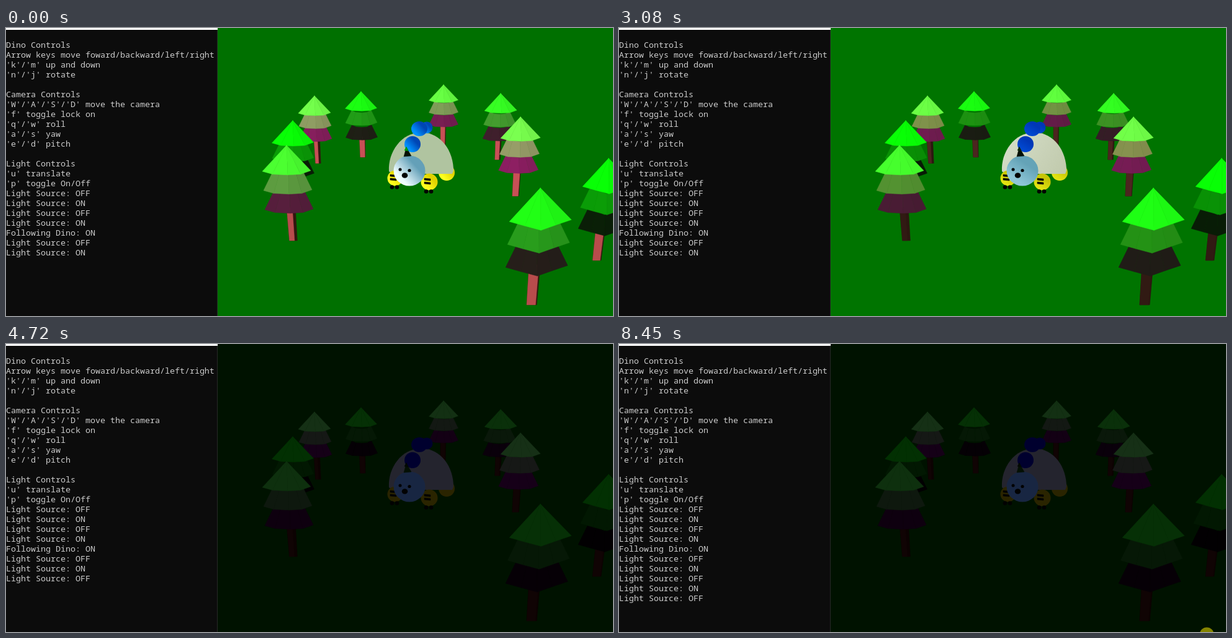
An HTML page with a canvas that plays this animation: 978 px wide and 466 px high, repeating every 8580 ms.

```html
<!DOCTYPE html>
<html lang="en">
<head>
<meta charset="utf-8">
<title>Dino scene with moving light</title>
<style>
html, body { margin: 0; width: 978px; height: 466px; overflow: hidden; background: #0c0c0c; }
canvas { position: absolute; left: 0; top: 0; }
pre { position: absolute; left: 0; top: 19px; margin: 0; color: #ccc;
  font: 13.333px/16px "Noto Sans Mono", monospace; }
</style>
</head>
<body>
<canvas id="stage" width="978" height="466"></canvas>
<pre id="log"></pre>
<script>
const LOOP = 8580;
const ctx = document.getElementById('stage').getContext('2d');
const log = document.getElementById('log');

const HELP = `Dino Controls
Arrow keys move foward/backward/left/right
'k'/'m' up and down
'n'/'j' rotate

Camera Controls
'W'/'A'/'S'/'D' move the camera
'f' toggle lock on
'q'/'w' roll
'a'/'s' yaw
'e'/'d' pitch

Light Controls
'u' translate
'p' toggle On/Off
Light Source: OFF
Light Source: ON
Light Source: OFF
Light Source: ON
Following Dino: ON
Light Source: OFF
Light Source: ON`;
const TOGGLES = [[4720, 'OFF'], [5780, 'ON'], [6650, 'OFF']];

// Colours by light position: start, nudged, behind, returning, front, switched off
const PALETTE = {
  ground:    '#007000 #007000 #007600 #007000 #007800 #001200',
  top:       '#78ff4e #78ff4e #70ff48 #70ff48 #d2ffaa #163016',
  mid:       '#949a66 #949a66 #869050 #82904a #d7e6af #161816',
  low:       '#8a1e60 #8c1e6a #781c58 #6e1c4b #cd2daf #160018',
  trunkFar:  '#c85056 #d05860 #301c14 #7d3434 #b05050 #100404',
  trunkNear: '#b84c4c #c45256 #301a12 #341a14 #823834 #100404',
  bark:      '#32160f #32160f #2c1810 #2c1610 #32160f #0c0202',
  bodyLit:   '#b0c4a0 #b0c4a0 #e6ebdc #b4c4a0 #ffffff #24242e',
  bodyShade: '#b0c4a0 #b0c4a0 #c8cdb4 #b4c4a0 #ffffff #24242e',
  faceLit:   '#eefcff #f4ffff #6eafc3 #c8f0fa #c8ebf5 #182642',
  faceShade: '#64a0b8 #78acc4 #64a5b9 #64a0b4 #96c8dc #182642',
  blueLit:   '#0091ff #0091ff #0041c8 #0055e1 #0091ff #00002e',
  blueShade: '#0046b4 #0046b4 #0037b9 #0037b4 #0078f0 #00002e',
  footLit:   '#ffff1e #ffff28 #d2d20a #ffff1e #ffff50 #2a2400',
  footShade: '#e1d200 #ebdc00 #bebe0a #d7d200 #f0dc00 #2a2400',
  cone:      '#00a000 #00a000 #082008 #083008 #00a000 #020802',
};
for (const key in PALETTE)
  PALETTE[key] = PALETTE[key].split(' ').map(h => [1, 3, 5].map(i => parseInt(h.slice(i, i + 2), 16)));
const FACET = [.05, .05, .03, .02, .12, 0];
const TILT = [.9, .5, 1, 2.5, .2, 0];

// apex x, y, half width, tier step x, y, trunk foot x, y, tint, dark share of trunk
const TREES = [
  [497, 109, 26, 1, 21, 503, 219, .95, .4],
  [572, 102, 25.5, .5, 23.5, 575, 209, .22, .1],
  [705, 91, 23.5, 0, 19.7, 704, 200, .85, .15],
  [797, 105, 26, -1.5, 22.5, 792, 213, .45, .25],
  [462, 149, 33.5, .5, 25, 466, 290, .07, .3],
  [829, 143, 32, -1.7, 26, 821, 272, 1, .1],
  [452, 189, 39, 2, 31, 463, 344, .62, .35],
  [861, 258, 50, -3, 37, 847, 448, .27, .12],
  [971, 210, 42, -3.5, 34, 952, 376, .07, .12],
];
// Hexagonal tier rims, seen with an edge or with a corner in front
const EDGE_RIM = [[-1, 1.08], [-.58, 1.2], [.05, 1.23], [.58, 1.2], [1, 1.05]];
const CORNER_RIM = [[-1, 1.09], [-.5, 1.23], [.02, 1.37], [.5, 1.2], [1, 1.03]];

let light = 0;
const lerp = (a, b, k) => a + (b - a) * k;
const ramp = (t, from, to) => Math.min(1, Math.max(0, (t - from) / (to - from)));
const atLight = list => lerp(list[Math.floor(light)], list[Math.ceil(light)], light % 1);
const rgb = c => `rgb(${c.map(v => Math.min(255, Math.round(v))).join()})`;
const tone = name => [0, 1, 2].map(i => atLight(PALETTE[name].map(c => c[i])));

function lightAt(t) {
  if (t >= 6650 || (t >= 4720 && t < 5780)) return 5;
  if (t < 1350) return 0;
  const step = t > 1870 && t < 4200 ? Math.floor((t + 20) / 70) * 70 - 20 : t;
  return 1 + ramp(step, 1800, 2360) + ramp(step, 2660, 3780) + ramp(step, 3780, 4200);
}

function poly(points, fill) {
  ctx.beginPath();
  points.forEach(p => ctx.lineTo(...p));
  ctx.closePath();
  ctx.fillStyle = ctx.strokeStyle = fill;
  ctx.lineWidth = .5;
  ctx.fill();
  ctx.stroke();
}

function disc(x, y, rx, fill, ry = rx) {
  ctx.beginPath();
  ctx.ellipse(x, y, rx, ry, 0, 0, 7);
  ctx.fillStyle = fill;
  ctx.fill();
}

function ball(x, y, r, name, ry = r) {
  const tilt = atLight(TILT), n = r / Math.hypot(1, tilt);
  const g = ctx.createLinearGradient(x - n, y + n * tilt, x + n, y - n * tilt);
  g.addColorStop(.15, rgb(tone(name + 'Lit')));
  g.addColorStop(.75, rgb(tone(name + 'Shade')));
  disc(x, y, r, g, ry);
}

function tree([x, apexY, w, dx, dy, bx, by, tint, dark]) {
  const y = apexY + .8, corner = w > 40;
  const ty = y + 2 * dy + w, tx = lerp(x, bx, (ty - y) / (by - y)), h = w * .18;
  const across = k => [[lerp(tx - h, tx + h, k), ty], [lerp(bx - h * .9, bx + h * .9, k), by]];
  const trunk = (a, b, fill) => poly([...across(a), ...across(b).reverse()], fill);
  trunk(0, 1, rgb(tone('bark')));
  trunk(0, 1 - dark, rgb(tone(w > 35 ? 'trunkNear' : 'trunkFar')));

  for (let tier = 2; tier >= 0; tier--) {
    const [r, g, b] = tone(['top', 'mid', 'low'][tier]);
    const cx = x + tier * dx, cy = y + tier * dy;
    const shape = corner ? CORNER_RIM : EDGE_RIM;
    const rim = shape.map(([u, v]) => [cx + u * w, cy + v * w]);
    const neck = shape.map(([u, v]) => tier ? [cx + u * w * .61, cy + (v - .8) * w] : [x, y]);
    for (let i = 0; i < 4; i++) {
      const shade = 1 + atLight(FACET) * [.2, .4, -.4, -1][i];
      poly([neck[i], rim[i], rim[i + 1], neck[i + 1]],
        rgb([r * tint * shade, g * shade, b * tint * shade]));
    }
  }
}

function foot(x, y, r) {
  ball(x, y, r, 'foot');
  for (const k of [-1, 1]) {
    disc(x - 1 + 4 * k, y + r + 2, 3.3, '#020202');
    poly([[x - 8, y - 3 + 3 * k], [x + 2, y - 2 + 3 * k], [x + 2, y + 1 + 3 * k], [x - 8, y + 3 * k]], '#020202');
  }
}

function dino() {
  const g = ctx.createLinearGradient(625, 180, 715, 235);
  g.addColorStop(0, rgb(tone('bodyLit')));
  g.addColorStop(1, rgb(tone('bodyShade')));
  ball(710, 234, 13, 'foot');
  ctx.beginPath();
  ctx.moveTo(617, 232);
  ctx.bezierCurveTo(615, 201, 637, 169, 669, 169);
  ctx.bezierCurveTo(701, 169, 721, 199, 721, 231);
  ctx.lineTo(719, 236);
  ctx.lineTo(622, 236);
  ctx.fillStyle = g;
  ctx.fill();

  ball(678, 161, 9.5, 'blue');
  ball(666, 163, 13, 'blue', 12);
  ball(655, 188, 13, 'blue');
  foot(627, 243, 12.5);
  foot(682, 249, 13.5);
  ball(650, 231, 25.5, 'face', 24.5);
  poly([[645, 193], [641, 208], [653, 207]], '#041004');
  poly([[645, 192], [642, 198], [648, 199]], rgb(tone('cone')));
  disc(635, 229, 2.5, '#020202');
  disc(650, 230.5, 2.6, '#020202');
  disc(642.5, 238.5, 4.8, '#020202', 4.3);
}

function draw(t) {
  light = lightAt(t);
  ctx.fillStyle = rgb(tone('ground'));
  ctx.fillRect(0, 0, 978, 466);
  TREES.forEach(tree);
  dino();
  if (t >= 8450) disc(947, 470, 11.5, '#848400');
  ctx.fillStyle = '#0c0c0c';
  ctx.fillRect(0, 0, 340, 466);
  ctx.fillStyle = '#282828';
  ctx.fillRect(340, 0, 1, 466);
  ctx.fillStyle = '#fff';
  ctx.fillRect(0, 0, 341, 3);

  const text = HELP + TOGGLES.filter(([at]) => t >= at).map(([, s]) => '\nLight Source: ' + s).join('');
  if (log.textContent !== text) log.textContent = text;
}

function frame() {
  draw(performance.now() % LOOP);
  requestAnimationFrame(frame);
}
frame();
</script>
</body>
</html>
```
